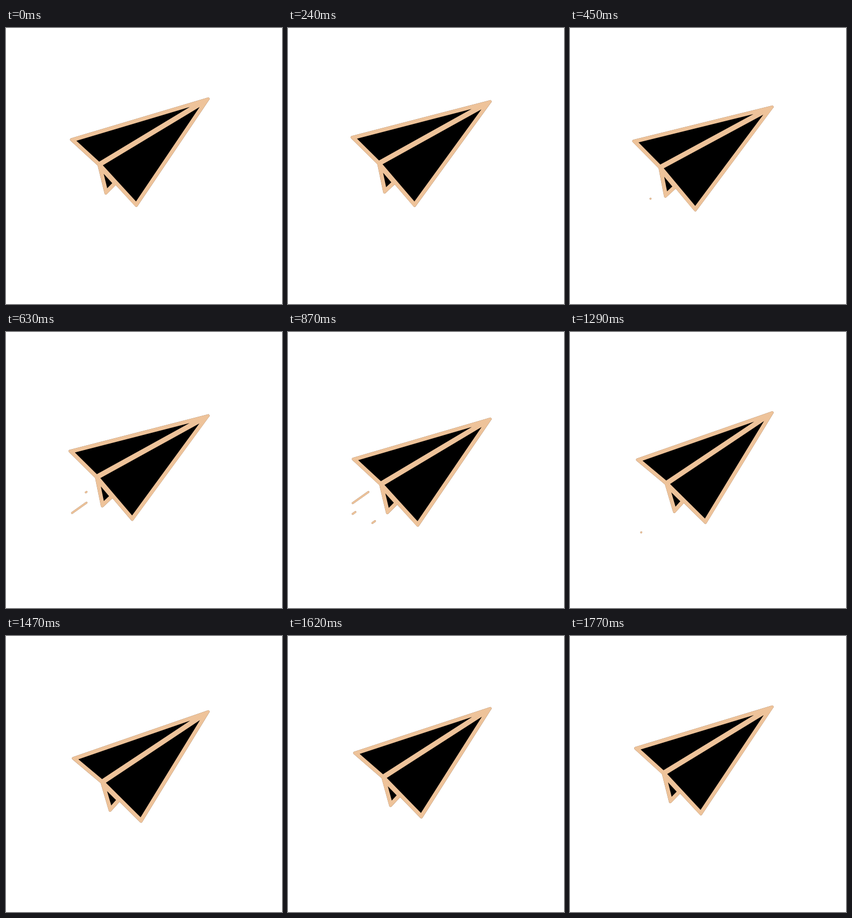
An HTML page with a canvas that plays this animation: 512x512 px, repeating every 1.8 s.

```html
<!DOCTYPE html>
<html lang="en">
<head>
<meta charset="utf-8">
<title>Paper plane</title>
<style>
  html, body { margin: 0; width: 100%; height: 100%; overflow: hidden; background: #fff; }
  canvas { display: block; width: 512px; height: 512px; }
</style>
</head>
<body>
<canvas id="stage" width="512" height="512"></canvas>
<script>
const ctx = document.getElementById('stage').getContext('2d');
const LOOP = 1800, STEP = 30;
const PEACH = '#eec39a', RIM = '#a58468';
const EDGE = 4.7, INSET = 4.7;

const point = (x, y) => ({ x, y });
const mix = (a, b, k) => point(a.x + (b.x - a.x) * k, a.y + (b.y - a.y) * k);
const dist = (a, b) => Math.hypot(a.x - b.x, a.y - b.y);
const ease = x => (1 - Math.cos(Math.PI * Math.min(1, Math.max(0, x)))) / 2;

// Plane in its level pose: three folded triangles meeting at the fold
const nose = point(375, 131.5);
const wing = point(121.3, 207);
const fold = point(172.3, 253.8);
const belly = point(241.8, 329.3);
const keel = point(185.2, 306.5);
const TRIANGLES = [
  [fold, keel, mix(fold, belly, 0.45)],
  [wing, nose, fold],
  [nose, belly, fold]
];

// Moves every side of a triangle inwards by d, scaling about its incentre
function inset([a, b, c], d) {
  const sides = [dist(b, c), dist(c, a), dist(a, b)];
  const girth = sides[0] + sides[1] + sides[2];
  const weigh = axis => (a[axis] * sides[0] + b[axis] * sides[1] + c[axis] * sides[2]) / girth;
  const centre = point(weigh('x'), weigh('y'));
  const area2 = Math.abs((b.x - a.x) * (c.y - a.y) - (c.x - a.x) * (b.y - a.y));
  return [a, b, c].map(p => mix(p, centre, d * girth / area2));
}

const PANELS = TRIANGLES.map(t => inset(t, INSET));

function trace(points) {
  ctx.beginPath();
  points.forEach(p => ctx.lineTo(p.x, p.y));
}

function slab(points, color, width = 0) {
  trace(points);
  ctx.closePath();
  ctx.fillStyle = ctx.strokeStyle = color;
  ctx.fill();
  if (width) {
    ctx.lineWidth = width;
    ctx.stroke();
  }
}

function drawPlane(phase) {
  ctx.save();
  ctx.translate(nose.x, nose.y + 15 * (1 - Math.cos(phase)));
  ctx.rotate(2.75 * Math.sin(phase) * Math.PI / 180);
  ctx.translate(-nose.x, -nose.y);
  TRIANGLES.forEach(t => slab(t, RIM, EDGE + 0.5));
  TRIANGLES.forEach(t => slab(t, PEACH, EDGE));
  PANELS.forEach(p => slab(p, '#000'));
  ctx.restore();
}

// Each trail grows from its near end, then shrinks away at the far end
const TRAILS = [
  { from: point(149.5, 316.5), start: 435 },
  { from: point(149.5, 296.5), start: 595 },
  { from: point(161.5, 350.8), start: 805 }
];
const GROW = 240, HOLD = 260;

function drawTrail({ from, start }, time) {
  const head = ease((time - start) / GROW);
  const tail = ease((time - start - HOLD) / GROW);
  if (head <= tail) return;
  const to = point(from.x - 29.5, from.y + 21);
  trace([mix(from, to, tail), mix(from, to, head)]);
  for (const [width, color] of [[3.5, RIM], [3, PEACH]]) {
    ctx.lineWidth = width;
    ctx.strokeStyle = color;
    ctx.stroke();
  }
}

function draw(time) {
  ctx.fillStyle = '#fff';
  ctx.fillRect(0, 0, 512, 512);
  ctx.lineJoin = ctx.lineCap = 'round';
  TRAILS.forEach(trail => drawTrail(trail, time));
  drawPlane(2 * Math.PI * time / LOOP);
}

const origin = performance.now();
function tick() {
  const time = (performance.now() - origin) % LOOP;
  draw(Math.floor(time / STEP) * STEP);
  requestAnimationFrame(tick);
}
tick();
</script>
</body>
</html>
```
